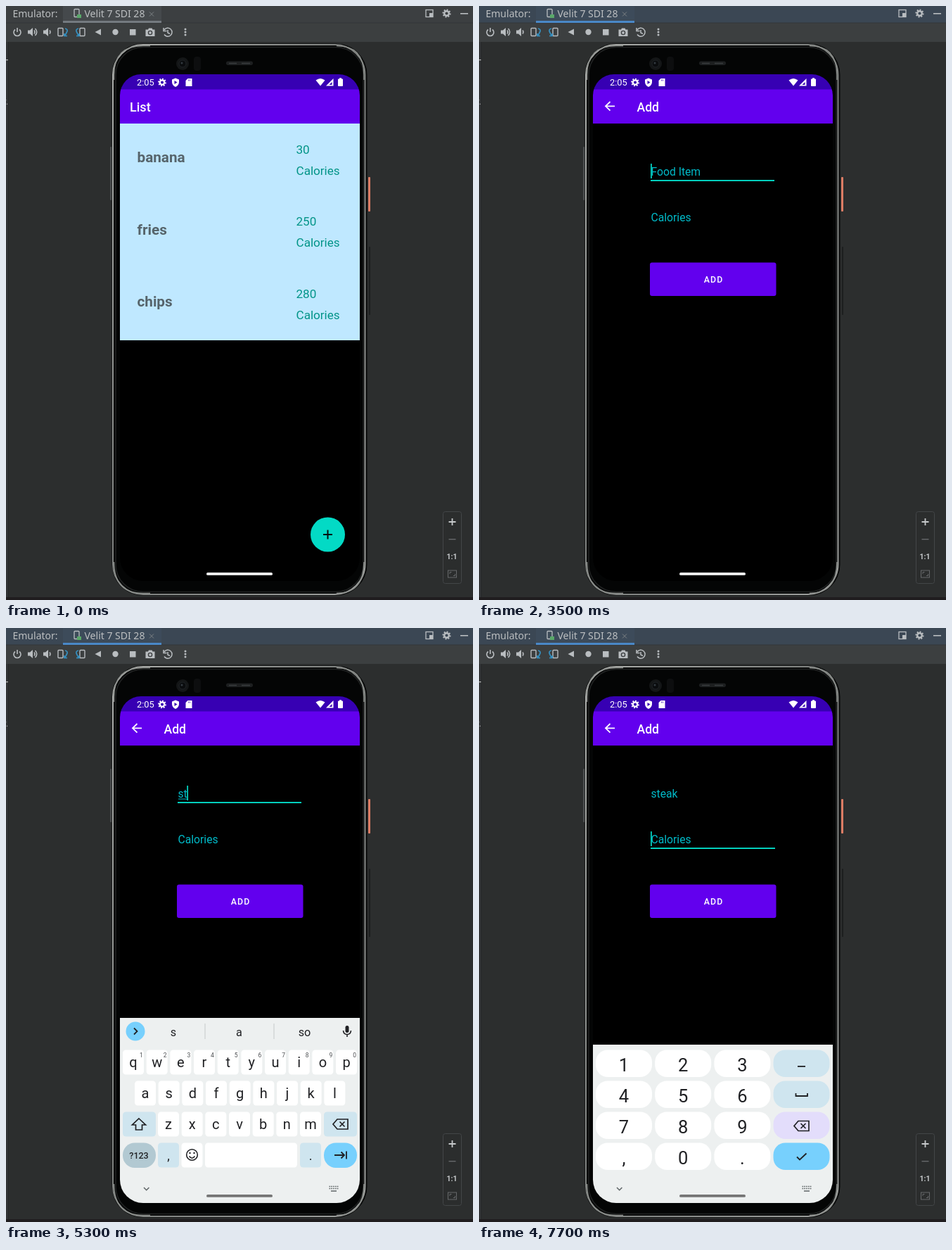
An HTML page for the animation above (8000 ms loop, 664 by 844 pixels).

```html
<!DOCTYPE html>
<html lang="en">
<head>
<meta charset="utf-8">
<title>Emulator</title>
<style>
html, body { margin: 0; width: 100%; height: 100%; overflow: hidden; background: #2c2e2e; }
svg { display: block; width: 100%; height: 100%; }
text { font-family: Roboto, sans-serif; white-space: pre; }
.ide { font-family: "Noto Sans", sans-serif; }
.mid { text-anchor: middle; }
.line { fill: none; }
</style>
</head>
<body>
<svg id="stage" viewBox="0 0 664 844"></svg>
<script>
const LOOP = 8000, STEP = 100;
const INK = '#202124', TEAL = '#03cfbd', HINT = '#00bac8', SKY = '#77d0fd', PALE = '#cfe5ef', ICON = '#b9bdc0';

const rect = (x, y, w, h, fill, r = 0, more = '') =>
  `<rect x="${x}" y="${y}" width="${w}" height="${h}" rx="${r}" fill="${fill}" ${more}/>`;
const dot = (x, y, r, fill, more = '') => `<circle cx="${x}" cy="${y}" r="${r}" fill="${fill}" ${more}/>`;
const line = (d, color, w = 1.5, more = '') =>
  `<path class="line" d="${d}" stroke="${color}" stroke-width="${w}" ${more}/>`;
const shape = (d, fill) => `<path d="${d}" fill="${fill}"/>`;
const text = (x, y, s, size, fill, more = '') =>
  `<text x="${x}" y="${y}" font-size="${size}" fill="${fill}" ${more}>${s}</text>`;
const mid = (x, y, s, size, fill, more = '') => text(x, y, s, size, fill, 'class="mid" ' + more);
const at = (x, y, body) => `<g transform="translate(${x} ${y})">${body}</g>`;
const layer = (id, body, more = '') => `<g id="${id}" ${more}>${body}</g>`;

const gear = (x, y, r, color) => at(x, y,
  dot(0, 0, r * .55, 'none', `stroke="${color}" stroke-width="${r * .4}"`) +
  dot(0, 0, r * .84, 'none', `stroke="${color}" stroke-width="${r * .34}" pathLength="16" stroke-dasharray="1"`));
const dots = (x, y, color, dx, dy) => [-1, 0, 1].map(i => dot(x + i * dx, y + i * dy, 1.5, color)).join('');
const backspace = (x, y) => at(x, y,
  line('M-4.5-7H10.500V7H-4.500L-10.500 0Z', INK, 1.7) + line('M-1-3.500L6 3.500M6-3.500L-1 3.500', INK, 1.7));
const speaker = (x, waves) => at(x, 37,
  shape('M-6-2.500H-3L1-6V6L-3 2.500H-6Z', ICON) +
  line('M3-2.500Q5 0 3 2.500' + (waves ? 'M4.500-5Q9 0 4.500 5' : ''), ICON));
const turn = (x, side) => at(x, 37,
  rect(-4 - side * 3, -5.500, 7, 11, 'none', 1, `stroke="${ICON}" stroke-width="1.4"`) +
  line(`M${side * 3}-5Q${side * 8}-4 ${side * 5} 1Q${side * 4} 4 ${side * 2} 5M${side * 2} 2V5.500H${side * 6}`, '#3592c4', 1.7));

function ide() {
  return rect(0, 0, 664, 844, '#2c2e2e') +
    rect(0, 50, 4, 790, '#313335') + rect(3, 50, 1, 790, '#262829') +
    rect(0, 840, 664, 4, '#201d1f') +
    rect(0, 0, 664, 24, '#3c3f41', 0, 'id="bar"') + rect(0, 24, 664, 27, '#3c3f40') +
    rect(0, 23.500, 664, 1, '#333638') +
    rect(81, 0, 140, 21, '#45494c', 0, 'id="tab"') + rect(81, 21, 140, 3, '#747a80', 0, 'id="mark"') +
    text(9.500, 15.500, 'Emulator:', 14, '#bcbfc1', 'class="ide"') +
    text(111.500, 15.500, 'Velit 7 SDI 28', 14, '#bcbfc1', 'class="ide"') +
    rect(97, 4.500, 7, 11, 'none', 1, `stroke="${ICON}" stroke-width="1.3"`) +
    rect(101, 12, 6, 5, '#59a869') + line('M204 8.500l6 6m0-6l-6 6', '#7d8285', 1) +
    rect(597, 5.500, 10, 10, 'none', 0, `stroke="${ICON}" stroke-width="1.3"`) + rect(602, 10, 5, 5, ICON) +
    gear(626.500, 10.500, 6, ICON) + rect(646, 10, 11, 1.600, ICON) +
    line('M13 33.500A5 5 0 1 0 19 33.500M16 31V37', ICON, 1.600) +
    speaker(37, true) + speaker(59, false) + turn(81, 1) + turn(106, -1) +
    shape('M126.500 37L135 32.500V41.500Z', ICON) + dot(155.500, 37, 4.200, ICON) + rect(176, 33, 8.500, 8.500, ICON) +
    shape('M198.500 33.500H202L203 31.500H207.500L208.500 33.500H211.500V43H198.500Z', ICON) +
    dot(205, 38, 2.600, 'none', 'stroke="#3c3f41" stroke-width="1.400"') +
    line('M225 34A6 6 0 1 1 225 40.500M224 31V35.500H228.500M230 34V38L233 39.500', ICON) +
    dots(255, 37, ICON, 0, 4) +
    text(-4, 53, ',', 13, '#b5b5b5') + rect(0, 76, 3, 1.200, '#b5b5b5') + text(-5, 140, 'y.', 12, '#b5b5b5') +
    rect(621.500, 718.500, 26, 102, '#2b2d2d', 3, 'stroke="#434648"') +
    line('M629.500 733H639.500M634.500 728V738', '#c5c8ca', 1.800) + rect(629.500, 757, 10, 1.400, '#67696b') +
    mid(634, 786, '1:1', 10.500, '#c5c8ca', 'font-weight="700"') +
    rect(628.500, 802, 12, 10, 'none', 0, 'stroke="#67696b"') +
    line('M631 807V804.500H633.500M638.500 807V809.500H636', '#67696b', 1);
}

function phone() {
  return rect(148, 200, 2.500, 76, '#4b4e4f', 1) + rect(515, 243, 3, 49, '#dc7c64', 1) +
    rect(516, 342, 2, 97, '#1d1f1f', 1) +
    rect(150.500, 53.500, 363, 784, '#080909', 44) +
    rect(152, 55, 358.500, 781, 'none', 43, 'stroke="url(#rim)" stroke-width="2"') +
    rect(156, 58.500, 352, 774, '#040505', 39, 'stroke="#202222" stroke-width="1.500"') +
    line('M153.500 105V98Q153.500 56.500 195 56.500H205M470 56.500Q509 56.500 509 98V105' +
      'M153.500 790Q153.500 834.500 195 834.500H205M470 834.500Q509 834.500 509 790', '#8b8e8b', 1.500) +
    dot(251, 82, 9, '#141617') + dot(251, 82, 5, '#0a0c0e', 'stroke="#202427"') + dot(250, 81, 1.500, '#333a40') +
    rect(267, 72, 10, 20, '#0d0e0f', 4) +
    rect(313, 78.500, 38, 5.500, '#1d1f20', 2.700) + line('M317 81.500H328M335 81.500H347', '#3a3d3f', 1.500);
}

function statusBar() {
  return rect(162, 97, 341, 22, '#3700b3') + rect(162, 118.500, 341, 48.500, '#6200ee') +
    text(186, 113, '2:05', 12.800, '#fff') + gear(222, 108.500, 5.800, '#fff') +
    shape('M241 102.500L246 104.500V108Q246 112.500 241 115Q236 112.500 236 108V104.500Z', '#fff') +
    shape('M239.500 106L243.500 108.500L239.500 111Z', '#3700b3') +
    shape('M258.500 103H264.500V114H255.500V106Z', '#fff') +
    line('M259.500 104.500V106.500M261.500 104.500V106.500', '#3700b3', .8) +
    shape('M440.500 105.500Q447 100.500 453.500 105.500L447 113.500Z', '#fff') +
    shape('M465.500 103V113.500H455Z', '#fff') + shape('M463.500 108V112H459.500Z', '#3700b3') +
    rect(472, 103.500, 7, 10.500, '#fff', 1) + rect(474, 102.300, 3, 2, '#fff');
}

function listScreen() {
  const rows = [['banana', 30], ['fries', 250], ['chips', 280]];
  return text(176, 150, 'List', 18, '#fff', 'font-weight="500"') + rect(162, 167, 341, 308, '#bfe8ff') +
    rows.map(([name, cal], i) => at(0, i * 102.700,
      text(186.500, 222, name, 20.700, '#56646b', 'font-weight="700"') +
      text(412.500, 209.500, cal, 17.100, '#029488') + text(412.500, 239.500, 'Calories', 17.100, '#029488'))).join('') +
    dot(457.500, 751, 24.500, '#03dac5') + dot(457.500, 751, 20, 'url(#press)', 'id="ripple"') +
    line('M451 751H464M457.500 744.500V757.500', '#04110f', 2);
}

function addScreen() {
  return line('M193 142.300H180.500M186.500 136L180 142.300L186.500 148.600', '#fff', 1.800) +
    text(224.500, 150, 'Add', 17.500, '#fff', 'font-weight="500"') +
    text(244.500, 241, 'Food Item', 15.700, HINT, 'id="food"') + text(244.500, 306, 'Calories', 15.700, HINT) +
    rect(245, 242.500, 0, 1, HINT, 0, 'id="compose"') +
    rect(244, 247, 176, 2, TEAL, 0, 'id="under"') + rect(244, 224, 1.800, 21, TEAL, 0, 'id="caret"') +
    rect(243, 364.500, 179.500, 47.500, '#6200ee', 3) +
    mid(333.500, 393, 'ADD', 12.300, '#fff', 'font-weight="500" letter-spacing="1.1"');
}

const key = (cx, y, label) => rect(cx - 15, y, 30, 35, '#fff', 4.500) + mid(cx, y + 24.500, label, 20, INK);

function letters() {
  const row = (keys, x, y) => [...keys].map((k, i) => key(x + i * 33.670, y, k)).join('');
  const nums = [...'1234567890'].map((n, i) => mid(192.500 + i * 33.670, 610, n, 8.500, '#4a4d50')).join('');
  return rect(162, 554, 341, 300, '#edf0f0') +
    layer('tools',
      at(229, 573, line('M-6.500-6.500H6.500V2L2 6.500H-6.500ZM6.500 2H2V6.500M-3 1Q0 4 2 1', INK, 1.600) +
        dot(-2.500, -2, 1, INK) + dot(2.500, -2, 1, INK)) +
      mid(277, 577, 'GIF', 11.500, INK, 'font-weight="800"') +
      at(327, 573, line('M-6-6H6V7.500H-6ZM-3.500 0H3.500M-3.500 3.500H2', INK, 1.600) + rect(-3, -8, 6, 4, INK, 1)) +
      gear(375.500, 573.500, 7.300, INK) + rect(405.500, 563, 1, 20, '#c6caca') + dots(436, 573.500, INK, 4.700, 0)) +
    layer('words', [283, 381].map(x => rect(x - .5, 562, 1, 22, '#c6caca')).join('') +
      [238, 331.500, 424.500].map((x, i) => mid(x, 580, '', 16.200, INK, `id="word${i}"`)).join('')) +
    dot(184, 573, 13.500, SKY) + layer('flip', line('M2-4.500L-2.500 0L2 4.500', INK, 1.800)) +
    at(485, 573, rect(-2.500, -8, 5, 10, INK, 2.500) + line('M-5.500-1Q-5 4.500 0 4.500Q5 4.500 5.500-1M0 4.500V8', INK, 1.600)) +
    row('qwertyuiop', 181, 599.500) + nums + row('asdfghjkl', 198, 643.500) + row('zxcvbnm', 231, 687.500) +
    rect(166, 687.500, 47, 35, PALE, 4.500) + rect(452, 687.500, 47, 35, PALE, 4.500) +
    line('M189 697L198.500 706H193.500V713H184.500V706H179.500Z', INK, 1.700) + backspace(475.500, 705) +
    rect(166, 731.500, 47, 35.500, '#b2c9d2', 17) + mid(189, 754, '?123', 12.500, INK, 'font-weight="500"') +
    rect(216, 731.500, 30, 35, PALE, 4.500) + mid(231, 756, ',', 18, INK) +
    rect(249.500, 731.500, 30, 35, '#fff', 4.500) + dot(264.500, 748.500, 7.800, 'none', `stroke="${INK}" stroke-width="1.600"`) +
    dot(261.500, 746, 1.200, INK) + dot(267.500, 746, 1.200, INK) + line('M260.500 750.500Q264.500 756 268.500 750.500', INK) +
    rect(283, 731.500, 131, 35, '#fff', 4.500) + rect(418, 731.500, 30, 35, PALE, 4.500) + mid(433, 756, '.', 18, INK) +
    rect(452, 731.500, 47, 35.500, SKY, 17, 'id="next"') +
    line('M467 749H481M476.500 744.500L481 749L476.500 753.500M484 743.500V754.500', INK, 1.800);
}

function digits() {
  const rows = ['123', '456', '789', ',0.'];
  const tints = [PALE, PALE, '#e3ddfb', SKY];
  return rect(162, 592, 341, 260, '#edf0f0') +
    rows.map((r, i) => {
      const y = 599.500 + i * 44;
      return [...r].map((c, j) => rect(166 + j * 84.200, y, 80, 38.500, '#fff', 17) +
        mid(206 + j * 84.200, y + 30, c, 25.500, INK)).join('') + rect(418.500, y, 80, 38.500, tints[i], 17);
    }).join('') +
    rect(453, 622, 11, 1.800, INK) + line('M450.500 661V665H467V661', INK, 1.800) + backspace(458.500, 707.500) +
    line('M452 751.500L456 755.500L465.500 746.500', INK, 1.800);
}

const stage = document.getElementById('stage');
stage.innerHTML = `<defs>
  <clipPath id="glass"><path d="M162 127A30 30 0 0 1 192 97H473A30 30 0 0 1 503 127V784A33 33 0 0 1 470 817H195A33 33 0 0 1 162 784Z"/></clipPath>
  <linearGradient id="rim" x2="1" y2="1"><stop stop-color="#b0b2af"/><stop offset=".5" stop-color="#7c7f7d"/><stop offset="1" stop-color="#a0a2a0"/></linearGradient>
  <radialGradient id="press"><stop stop-color="#087f74"/><stop offset=".6" stop-color="#05b3a2"/><stop offset="1" stop-color="#03dac5"/></radialGradient>
  </defs>` + ide() + phone() +
  layer('screen', rect(162, 97, 341, 720, '#000') + statusBar() +
    layer('list', listScreen()) + layer('add', addScreen()) +
    layer('letters', letters()) + layer('digits', digits()) +
    layer('nav', line('M196 795L199.700 798.700L203.400 795', '#5f6567', 1.500) +
      line('M459.500 793.500H472.500M459.500 796.500H472.500', '#5f6567', 1.700, 'stroke-dasharray="1.700 1.100"') +
      line('M462 800H470', '#5f6567', 1.500)) +
    rect(285, 805, 94, 3.800, '#fff', 1.900, 'id="home"'), 'clip-path="url(#glass)"');

const el = {};
stage.querySelectorAll('[id]').forEach(n => el[n.id] = n);
const set = (id, attrs) => { for (const k in attrs) el[id].setAttribute(k, attrs[k]); };
const show = (id, on) => set(id, { visibility: on ? 'visible' : 'hidden' });
const ramp = (t, a, b) => Math.min(1, Math.max(0, (t - a) / (b - a)));
const latest = (list, t) => list.filter(e => e[0] <= t).pop()[1];

const typed = [[0, ''], [4900, 's'], [5200, 'st'], [5500, 'ste'], [5700, 'stea'], [6300, 'steak']];
const composed = [[0, 0], [5000, 1], [5300, 2], [5800, 3], [6000, 4], [6500, 5], [7400, 0]];
const guesses = [[0, 'I the I’m'], [5000, 's a so'], [5500, 'st at so'], [5800, 'ste the see'],
  [6000, 'stea steak steam'], [6500, 'steak steaks speak']];

function draw(time) {
  const t = Math.floor(time / STEP) * STEP;
  const active = t >= 1500, adding = t >= 1800, second = t >= 7400;
  set('bar', { fill: active ? '#3b4754' : '#3c3f41' });
  set('tab', { fill: active ? '#3d4b5a' : '#45494c' });
  set('mark', { fill: active ? '#4a88c7' : '#747a80' });

  show('list', !adding);
  show('add', adding);
  set('ripple', { r: 11 + 9 * ramp(t, 1600, 1700), opacity: t >= 1600 ? 1 : 0 });

  const word = latest(typed, t);
  el.food.textContent = word || 'Food Item';
  const n = latest(composed, t);
  set('compose', { width: n ? el.food.getSubStringLength(0, n) : 0 });
  const end = word && !second ? el.food.getComputedTextLength() : 0;
  const dy = second ? 65 : 0;
  const blink = t >= 4500 && t < 4900 || t >= 7000 && t < 7400;
  show('under', t >= 3500);
  show('caret', t >= 3500 && !blink);
  set('under', { y: 247 + dy, width: second ? 177 : 176 });
  set('caret', { x: 244 + end, y: 224 + dy });

  const board = t >= 3900;
  show('letters', board && t < 7500);
  show('digits', t >= 7500);
  set('letters', { transform: `translate(0 ${t < 4000 ? 110 : t < 4100 ? 1.5 : 0})` });
  const fold = ramp(t, 4300, 4700);
  set('tools', { opacity: 1 - fold });
  set('words', { opacity: fold });
  set('flip', { transform: `translate(184 573) rotate(${180 * fold})` });
  latest(guesses, t).split(' ').forEach((w, i) => el['word' + i].textContent = w);
  set('next', { fill: second ? '#5fb4dc' : SKY });

  set('nav', { opacity: ramp(t, 3900, 4400) });
  const tone = Math.round(255 - 138 * ramp(t, 4000, 4400));
  set('home', { fill: `rgb(${tone},${tone},${tone})` });
}

const start = performance.now();
function tick() {
  draw((performance.now() - start) % LOOP);
  requestAnimationFrame(tick);
}
tick();
</script>
</body>
</html>
```
